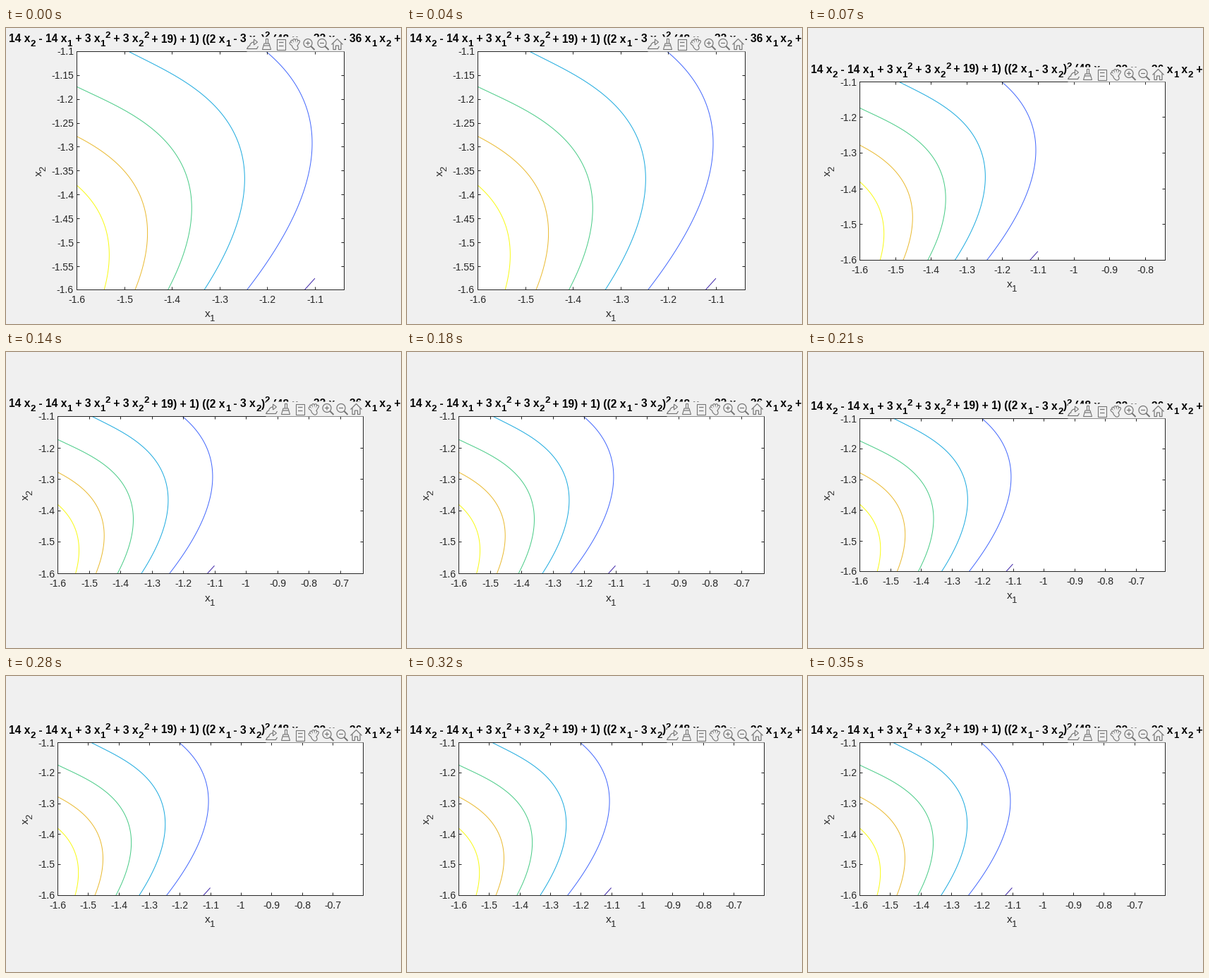
A matplotlib script that plays this animation: 560x420 px, repeating every 420 ms.

```python
import matplotlib.pyplot as plt
import numpy as np
from matplotlib.animation import FuncAnimation
from matplotlib.patches import Polygon, Rectangle

WIDTH, HEIGHT, DPI = 560, 420, 100
PX = 72 / DPI  # one pixel in points
FRAMES = 6
PAPER, INK, ICON = "#f0f0f0", "#262626", "#747474"
LEVELS = np.arange(2000, 12001, 2000)
COLORS = ["#3e26a8", "#4367fd", "#1caadf", "#48cb86", "#eaba30", "#f9fb15"]
TITLE = ("14 x_2 - 14 x_1 + 3 x_1^2 + 3 x_2^2 + 19) + 1) "
         "((2 x_1 - 3 x_2)^2 (48 x_2 - 32 x_1 - 36 x_1 x_2 +")
LOW, HIGH = -1.6, -1.1
MIDDLE = 202.8

plt.rcParams["font.family"] = "Liberation Sans"
fig = plt.figure(figsize=(WIDTH / DPI, HEIGHT / DPI), dpi=DPI, facecolor=PAPER)
stage = fig.add_axes([0, 0, 1, 1])


def goldstein_price(x, y):
    a = 1 + (x + y + 1)**2 * (19 - 14*x + 3*x**2 - 14*y + 6*x*y + 3*y**2)
    b = 30 + (2*x - 3*y)**2 * (18 - 32*x + 12*x**2 + 48*y - 36*x*y + 27*y**2)
    return a * b


GRID_X, GRID_Y = np.meshgrid(*[np.linspace(LOW, HIGH, 141)] * 2)
GRID_F = goldstein_price(GRID_X, GRID_Y)


def line(points, color=INK, width=1.0, zorder=3, cap="butt"):
    xs, ys = zip(*points)
    stage.plot(xs, ys, color=color, lw=width * PX, zorder=zorder, snap=False,
               solid_capstyle=cap, solid_joinstyle="miter")


def box(x0, y0, x1, y1, color, zorder):
    stage.add_patch(Rectangle((x0, y0), x1 - x0, y1 - y0, fc=color, lw=0,
                              zorder=zorder, snap=False))


def advance(text, size, weight):
    def extent(s):
        probe = fig.text(0, 0, s, size=size * PX, weight=weight)
        width = probe.get_window_extent().width
        probe.remove()
        return width
    return extent("|" + text + "|") - extent("||")


def split_runs(tex):
    """Split text into (string, shift); shift 1 is a subscript, -1 a superscript."""
    runs, plain, chars = [], "", iter(tex)
    for c in chars:
        if c in "_^":
            if plain:
                runs.append((plain, 0))
            runs.append((next(chars), 1 if c == "_" else -1))
            plain = ""
        else:
            plain += c
    return runs + [(plain, 0)] if plain else runs


def layout(tex, size, weight="normal"):
    placed, pen = [], 0
    for text, shift in split_runs(tex):
        run_size = size * (0.85 if shift else 1)
        placed.append((text, shift, run_size, pen))
        pen += advance(text, run_size, weight)
    return placed, pen


TITLE_RUNS = layout(TITLE, 15.6, "bold")
X_RUNS = layout("x_1", 15.4)
Y_RUNS = layout("x_2", 15.4)


def rich_text(x, y, laid, color=INK, weight="normal", centred=True, upright=False):
    runs, total = laid
    for text, shift, size, pen in runs:
        along = pen - (total / 2 if centred else 0)
        drop = 6 * shift
        px, py = (x + drop, y - along) if upright else (x + along, y + drop)
        stage.text(px, py, text, size=size * PX, weight=weight, color=color,
                   rotation=90 if upright else 0, rotation_mode="anchor",
                   ha="left", va="baseline", zorder=4)


def mirrored(half):
    return half + [(-x, y) for x, y in reversed(half)]


def arc(cx, cy, r, start=0, stop=2 * np.pi):
    t = np.linspace(start, stop, 40)
    return list(zip(cx + r * np.cos(t), cy + r * np.sin(t)))


def icon_export(pen, shape):
    pen([(-5, 2), (-8, 6.5), (6, 6.5), (8, 3)])
    pen(arc(2, 3, 6, np.pi, 1.5 * np.pi))
    shape([(2, -7), (7, -3), (2, 1)])


def icon_brush(pen, shape):
    shape(mirrored([(-1.2, -8), (-1.2, -1)]))
    shape(mirrored([(-3.5, -1), (-6, 7.5)]))
    pen([(-4.3, 2), (4.3, 2)])


def icon_page(pen, shape):
    shape(mirrored([(-6, -7.5), (-6, 7.5)]))
    for y in (-2.5, 2.5):
        pen([(-2.5, y), (4, y)])


def icon_hand(pen, shape):
    spread = np.radians(np.linspace(-55, 35, 5))
    for color, width in ((ICON, 4.4), (PAPER, 2.2)):
        for a in spread:
            reach = 6 + 3 * np.cos(a)
            pen([(0.5, 4), (0.5 + reach * np.sin(a), 3 - reach * np.cos(a))],
                color, width, "round")
        pen([(-0.5, 3), (1.5, 5)], color, width + 3, "round")


def icon_zoom(plus):
    def draw_icon(pen, shape):
        pen(arc(-1.5, -1.5, 6))
        pen([(2.8, 2.8), (8, 8)], ICON, 2)
        pen([(-4.5, -1.5), (1.5, -1.5)])
        if plus:
            pen([(-1.5, -4.5), (-1.5, 1.5)])
    return draw_icon


def icon_home(pen, shape):
    pen(mirrored([(-8, 0.5), (0, -7.5)]))
    pen(mirrored([(-5.5, -1.5), (-5.5, 7.5), (-2, 7.5), (-2, 2)]))


ICONS = [icon_export, icon_brush, icon_page, icon_hand,
         icon_zoom(True), icon_zoom(False), icon_home]


def draw_toolbar(right, top):
    box(right - 138, top - 21, right, top, PAPER, 5)
    cy = top - 10.5
    for k, icon in enumerate(reversed(ICONS)):
        cx = right - 10 - 20 * k

        def place(points):
            return [(cx + x, cy + y) for x, y in points]

        def pen(points, color=ICON, width=1.2, cap="butt"):
            line(place(points), color, width, 7, cap)

        def shape(points):
            stage.add_patch(Polygon(place(points), fc=PAPER, ec=ICON,
                                    lw=1.1 * PX, zorder=6))

        icon(pen, shape)


def pixel_centre(v):
    return np.floor(v) + 0.5


def ticks(stop, step):
    return LOW + step * np.arange(int((stop - LOW) / step + 1e-6) + 1)


def draw_axes(left, right, top, bottom, scale, y_step):
    def to_x(x):
        return left - 0.6 + (x - LOW) * scale

    def to_y(y):
        return MIDDLE - (y - (LOW + HIGH) / 2) * scale

    box(left, top, right, bottom, "white", 1)
    stage.contour(to_x(GRID_X), to_y(GRID_Y), GRID_F, levels=LEVELS,
                  colors=COLORS, linewidths=PX, zorder=2)
    line([(left, top), (right, top), (right, bottom), (left, bottom),
          (left, top), (right, top)])

    font = dict(size=14 * PX, color=INK, va="baseline", zorder=4)
    for value in ticks(LOW + (right - left) / scale, 0.1):
        x = pixel_centre(to_x(value) + 0.6)
        line([(x, bottom), (x, bottom - 4)])
        line([(x, top), (x, top + 4)])
        stage.text(x - 0.5, bottom + 18.5, f"{value:.4g}", ha="center", **font)
    for value in ticks(HIGH, y_step):
        y = pixel_centre(to_y(value))
        line([(left, y), (left + 4, y)])
        line([(right, y), (right - 4, y)])
        stage.text(left - 4.5, y + 5, f"{value:.4g}", ha="right", **font)


def draw(i):
    # The first layout fills the height; later ones settle onto the full width.
    first = i == 0
    left, right = (100.5, 479.5) if first else (73.5, 506.5)
    scale = 676 if first else (right - left) + 73 / 6**(i - 1)
    half = scale * (HIGH - LOW) / 2
    top, bottom = pixel_centre(MIDDLE - half), pixel_centre(MIDDLE + half)

    stage.clear()
    draw_axes(left, right, top, bottom, scale, 0.05 if first else 0.1)
    rich_text(4, top - 13, TITLE_RUNS, "black", "bold", centred=False)
    rich_text((left + right) / 2 - 1, bottom + 39, X_RUNS)
    rich_text(left - (50 if first else 42), MIDDLE, Y_RUNS, upright=True)
    draw_toolbar(right, top)
    stage.set(xlim=(0, WIDTH), ylim=(HEIGHT, 0))
    stage.axis("off")
    return []


anim = FuncAnimation(fig, draw, frames=FRAMES, init_func=lambda: draw(0),
                     interval=70, repeat=True, repeat_delay=0)
plt.show()
```
